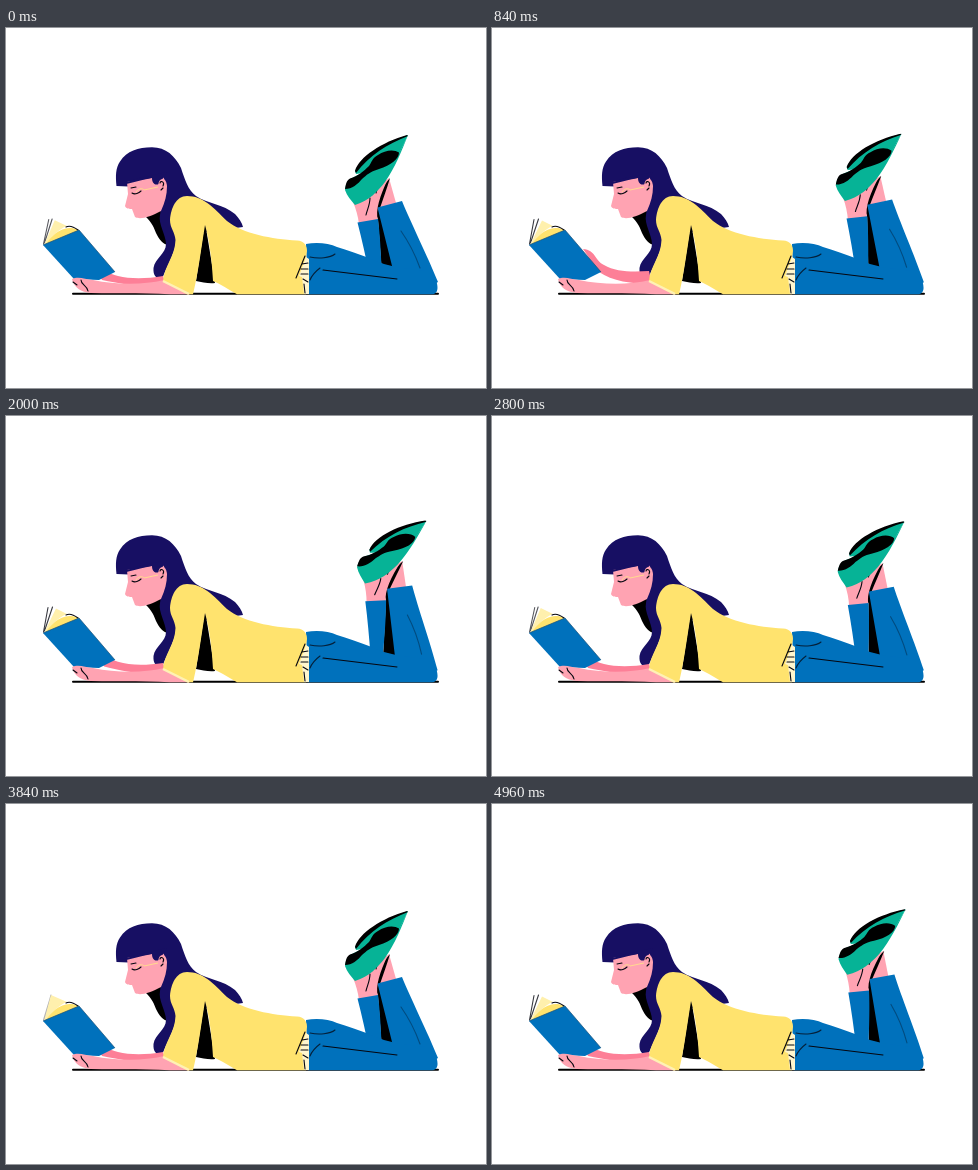
Write an HTML page that moves like this. It is 480 by 360 pixels and loops after 5 s.

```html
<!DOCTYPE html>
<html lang="en">
<head>
<meta charset="utf-8">
<title>Reading on the floor</title>
<style>
  html, body { margin: 0; width: 100%; height: 100%; overflow: hidden; background: #fff; }
  svg { display: block; width: 100vw; height: 100vh; }
  .line { fill: none; stroke: #05060f; stroke-width: 1.1; stroke-linecap: round; }
  .skin { fill: #ffa3b2; }
  .shade { fill: #fd7f97; }
  .jeans { fill: #0071bc; }
  .shirt { fill: #ffe36e; }
  .hair { fill: #170f63; }
  .shoe { fill: #06b396; }
  .cream { fill: #fff0ad; }
</style>
</head>
<body>
<svg viewBox="0 0 480 360">
  <path d="M67 265.8H432" stroke="#000" stroke-width="2" stroke-linecap="round"/>

  <g id="leg">
    <!-- far leg and shoe -->
    <path class="skin" d="M383 150L390 175L371 182L374 160Z"/>
    <path d="M384 150C377 158 368 170 369 183L372 192L376 246H390L374 180C377 171 381 160 384 150Z"/>
    <path class="jeans" d="M371.5 179.5L396 173C404 193 422 229 432 254L418 262L388 246Z"/>
    <path class="line" d="M395 203C402 213 409 226 414 240" stroke-opacity=".35"/>
    <path class="shoe" d="M349 143C357 127 378 115 402 107L391 130L364 140L357 145L350 146Z"/>
    <path d="M349 143C353 129 376 114 401 107L402 108C381 116 364 127 350 145Z"/>
    <!-- near leg and shoe -->
    <path class="skin" d="M347 174C350 181 352 188 353 196L372 192C369 183 374 167 382 151L362 163Z"/>
    <path class="line" d="M364 170C364 177 361 182 360 187M370 165L371 161" stroke-width=".7"/>
    <path class="jeans" d="M351.5 194.5L372 191C374 207 375 225 376 250L364 250C360 230 356 212 351.5 194.5Z"/>
    <path class="shoe" d="M339 162C340 155 342 152 346 150L392 127L402 107C396 122 389 140 379 154C371 164 364 172 349 177C345 172 341 168 339 162Z"/>
    <path d="M339 161C340 155 341 152 344 150.5C352 148 358 143 363 138C366 134 366 130 372 127C379 122 388 121 393 124.5C393 131 385 137 373 141C363 144 361 147 356 151C352 156 346 161 339 161Z"/>
  </g>

  <!-- jeans -->
  <path class="jeans" d="M300 216C310 214 323 215 331 219C343 223 353 226 363 230L378 236L390 239L420 243L429 249C432 257 434 266.3 425 266.3H302Z"/>
  <path class="line" d="M317 242L391 251"/>
  <path class="line" d="M304 229C313 231 324 230 329 226M304 252C306 247 310 243 314 240" stroke-width=".8" stroke-opacity=".75"/>

  <!-- neck, face, hair -->
  <path d="M140 189L158 176L163 217C157 217 153 211 150 205C147 197 145 194 140 189Z"/>
  <path class="hair" d="M110.5 158C109.5 148 109.5 140 114 133.5C121 123 132 119.3 146 119.3C160 119.3 169 128 175 140C179 152 182 162 190 168C202 176 217 176 229 186C233 190 236 195 237 199L200 204L172 211C166 231 160 241 156 251C150 250 147 248 147.5 240C149 230 160 226 160 216C160 207 152 196 154 187L158 160Z"/>
  <path class="skin" d="M121 154L122 166L119 178C120 181 124 181 126 181L129 189C134 192 144 189 155 183C159 174 161 167 161 158L157 148Z"/>
  <path class="hair" d="M110.5 158C120 155 129 150 143 148L160 144C161 149 155 150 153 156C148 158 146 154 146 150C135 152 122 156 110.5 158Z"/>
  <ellipse class="skin" cx="156.5" cy="157" rx="4.2" ry="6"/>
  <path class="line" d="M154 155C155 152 159 154 157 158M155 162L157 160" stroke-width=".8"/>
  <path class="line" d="M126 165C129 167 133 165 135 163M125 160L130 159" stroke-width=".9"/>
  <path d="M130 164C133 159 138 161 138 162L152 159" fill="none" stroke="#ffe08b" stroke-width=".9"/>

  <path id="farArm" class="shade"/>

  <!-- book -->
  <path d="M37 217L45 191L61 198L73 202L56 211Z" fill="#fff"/>
  <path id="edges" class="line"/>
  <path id="leaf" class="cream"/>
  <path class="shirt" d="M39 217C46 208 56 195 73 202L70 206L42 219Z"/>
  <path class="line" d="M60 199C64 197 68 199 72 202" stroke-width=".7"/>
  <path d="M37 217L73 202L109 244L93 252L68 251Z" fill="#0071bc"/>
  <path d="M37 217L73 202L109 244" fill="none" stroke="#174f78" stroke-width=".7"/>

  <!-- near arm -->
  <path class="skin" d="M66 251C72 248 79 251 87 252C111 257 137 257 158 252L184 266.3H164C138 264.5 111 265.5 85 265C75 264 68 260 66 251Z"/>
  <path class="line" d="M75 252C75 257 81 257 82 263M67 254L71 257" stroke-width="1"/>

  <!-- shirt -->
  <path d="M199 194L209 255C203 256 196 254 190 253Z"/>
  <path class="shirt" d="M181 168C197 168 207 179 221 193C237 206 266 211 291 212.5C298 213 301 217 301 223L297 248L300 266.3H231C222 261 214 256 207 253C206 234 204 215 199 197C195 222 192 246 187 266.3L181 266.3L157 253C158 238 169 229 169.5 212C169 204 164 200 164 192C165 180 170 168 181 168Z"/>
  <path d="M157 253L183 266" stroke="#fff1b5" stroke-width="2.4"/>
  <path d="M300 229L303 231L303 266H298L296 249L293 248Z" fill="#fff6ce"/>
  <path class="line" d="M299 228L290 250M296 236L302 235M295 241L302 241M295 246L302 246M297 251L302 254M298 256L299 265" stroke-width=".9"/>
</svg>
<script>
  const LOOP = 5000, SWING = 3840, MAX_TURN = 7.3;
  const part = id => document.getElementById(id);
  const leg = part('leg'), arm = part('farArm'), leaf = part('leaf'), edges = part('edges');

  // [time, value] steps
  const armKeys = [[0, 0], [250, 0], [840, 1], [1250, 1], [2000, .2], [2400, 0], [LOOP, 0]];
  const fanKeys = [[0, .75], [840, 1], [2000, 1], [2800, .75], [3400, 0], [4280, 0], [4960, 1], [LOOP, 1]];

  const mix = (a, b, k) => a + (b - a) * k;

  function valueAt(keys, t) {
    const i = keys.findIndex(k => k[0] > t);
    const [t0, a] = keys[i - 1], [t1, b] = keys[i];
    const k = (t - t0) / (t1 - t0);
    return mix(a, b, k * k * (3 - 2 * k));
  }

  function draw(t) {
    const swing = (1 - Math.cos(2 * Math.PI * t / SWING)) / 2;
    leg.setAttribute('transform', `translate(0 ${-1.4 * swing}) rotate(${MAX_TURN * swing} 418 252)`);

    const lift = valueAt(armKeys, t);
    const at = (low, high) => mix(low, high, lift);
    arm.setAttribute('d',
      `M91 ${at(243, 221)}C${at(99, 104)} ${at(244, 222)} 102 ${at(245, 232)} 112 ${at(248, 237)}` +
      `C124 ${at(251, 244)} 140 ${at(251, 244)} 157 ${at(248, 243)}L160 256` +
      `C140 ${at(260, 256)} 120 ${at(257, 253)} ${at(96, 107)} ${at(252, 244)}Z`);

    const fan = valueAt(fanKeys, t);
    const x = 45 + 5 * fan;
    leaf.setAttribute('d', `M38 217L${x} ${191 + 1.5 * fan}L61 198C53 201 46 208 40 217Z`);
    edges.setAttribute('d', `M37.5 216L${45 - 3 * fan} 191.5M38.5 215L${45 + 1.5 * fan} 191`);
    edges.setAttribute('stroke-opacity', .3 + .5 * fan);
  }

  function tick(now) {
    draw(now % LOOP);
    requestAnimationFrame(tick);
  }
  draw(0);
  requestAnimationFrame(tick);
</script>
</body>
</html>
```
